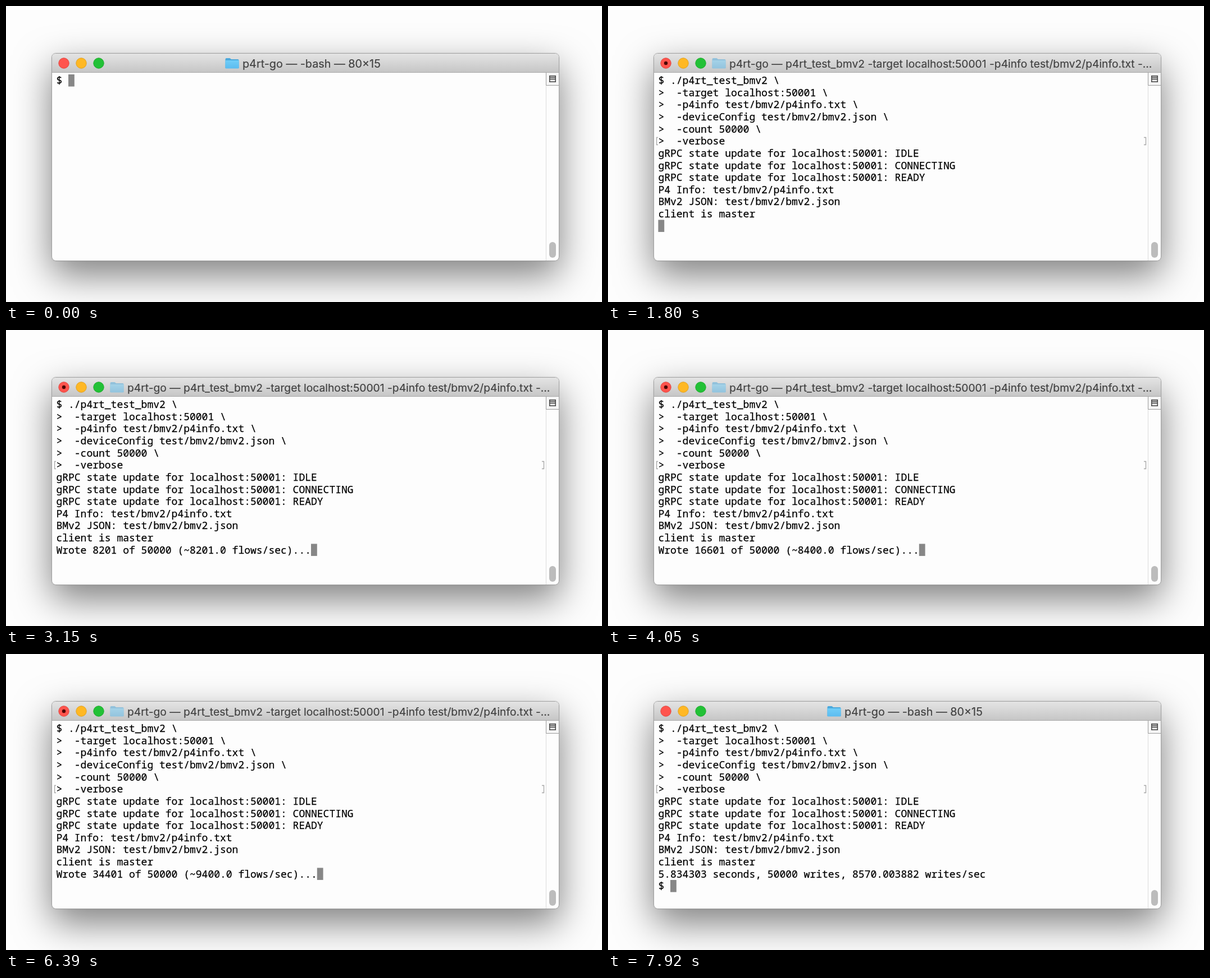
Animation of 1061x528 px, one loop 8000 ms. Source, as an HTML page:

```html
<!DOCTYPE html>
<html lang="en">
<head>
<meta charset="utf-8">
<title>Terminal</title>
<style>
  html, body { margin: 0; width: 100%; height: 100%; overflow: hidden; background: #fdfdfd; }
  .window {
    position: absolute; left: 81px; top: 84px; width: 904px; height: 371px;
    border-radius: 8px;
    box-shadow: 0 25px 66px rgba(0, 0, 0, .5), 0 0 1px rgba(0, 0, 0, .45);
  }
  svg { position: absolute; left: 0; top: 0; display: block; }
  .title { font: 19.25px Inter, "Open Sans", sans-serif; fill: #414141; stroke: #414141; stroke-width: .2; }
  #idleTitle .title { font-size: 19.8px; }
  .term {
    font: 18px "Noto Sans Mono", "DejaVu Sans Mono", monospace;
    fill: #000; stroke: #000; stroke-width: .25;
  }
</style>
</head>
<body>
<div class="window"></div>
<svg width="1061" height="528" viewBox="0 0 1061 528">
  <defs>
    <linearGradient id="bar" x2="0" y2="1">
      <stop offset="0" stop-color="#e4e4e4"/>
      <stop offset="1" stop-color="#c6c6c6"/>
    </linearGradient>
    <linearGradient id="paper" x2="0" y2="1">
      <stop offset="0" stop-color="#70cdf7"/>
      <stop offset="1" stop-color="#5bbcf0"/>
    </linearGradient>
    <g id="folder">
      <path d="M0 2Q0 0 2 0H8L10.5 2H22Q24 2 24 4V18H0Z" fill="#4ba9dc"/>
      <path d="M0 4H24V17Q24 18.5 22.5 18.5H1.5Q0 18.5 0 17Z" fill="url(#paper)"/>
    </g>
  </defs>

  <rect x="81.5" y="84.5" width="903" height="370" rx="7.5" fill="#fdfdfd" stroke="#a3a3a3"/>
  <path d="M82 118V92Q82 85 89 85H977Q984 85 984 92V118Z" fill="url(#bar)"/>
  <path d="M82 118.5H984" stroke="#a9a9a9"/>

  <g stroke-width="1">
    <circle cx="103" cy="102" r="9.2" fill="#ff544d" stroke="#e2443e"/>
    <circle cx="134" cy="102" r="9.2" fill="#ffb824" stroke="#e2a01d"/>
    <circle cx="165" cy="102" r="9.2" fill="#22c136" stroke="#1aab29"/>
  </g>
  <circle id="busyDot" cx="103" cy="102" r="3.2" fill="#4c0603"/>

  <g id="idleTitle">
    <use href="#folder" x="390.5" y="93"/>
    <text class="title" x="421" y="109.5">p4rt-go — -bash — 80×15</text>
  </g>
  <g id="busyTitle">
    <use href="#folder" x="185.5" y="93" opacity=".5"/>
    <text class="title" x="216" y="109.5">p4rt-go — p4rt_test_bmv2 -target localhost:50001 -p4info test/bmv2/p4info.txt -…</text>
  </g>

  <path d="M961.5 119V454" stroke="#dcdcdc"/>
  <rect x="962" y="119" width="22" height="22" fill="#f6f6f6"/>
  <path d="M961.5 119V141.5H984" fill="none" stroke="#9a9a9a"/>
  <rect x="967.75" y="124.75" width="10.5" height="10.5" fill="#e8e8e8" stroke="#454545" stroke-width="1.5"/>
  <path d="M968 127.5H978M968 130.5H978" stroke="#454545" stroke-width="1.4"/>
  <rect x="967" y="421" width="12" height="28" rx="6" fill="#bcbcbc"/>

  <path id="marks" d="M89 234.5H86.5V247.5H89M954 234.5H957.5V247.5H954" fill="none" stroke="#a6a6a6" stroke-width="1.3"/>
  <rect id="cursor" width="10.8" height="21.6" fill="#878787"/>
  <g id="screen" class="term"></g>
</svg>

<script>
const LOOP = 8000;
const LEFT = 89.4, TOP = 122, CELL = 10.8, ROW = 21.62, BASE = 17.2;
const PASTE = 720, ENTER = 1260, START = 1800, DONE = START + 5834;

const command = [
  "$ ./p4rt_test_bmv2 \\",
  ">  -target localhost:50001 \\",
  ">  -p4info test/bmv2/p4info.txt \\",
  ">  -deviceConfig test/bmv2/bmv2.json \\",
  ">  -count 50000 \\",
  ">  -verbose",
];
const output = [
  [1350, "gRPC state update for localhost:50001: IDLE"],
  [1350, "gRPC state update for localhost:50001: CONNECTING"],
  [1350, "gRPC state update for localhost:50001: READY"],
  [1440, "P4 Info: test/bmv2/p4info.txt"],
  [1440, "BMv2 JSON: test/bmv2/bmv2.json"],
  [1440, "client is master"],
];
const totals = [0, 8201, 16601, 25001, 34401, 43001];

const $ = id => document.getElementById(id);
const show = (id, on) => $(id).setAttribute("visibility", on ? "visible" : "hidden");

// The last entry is the line that holds the cursor.
function linesAt(t) {
  if (t < PASTE) return ["$ "];
  if (t < ENTER) return command;
  const lines = command.concat(output.filter(([at]) => t >= at).map(([, text]) => text));
  if (t >= DONE) {
    return lines.concat("5.834303 seconds, 50000 writes, 8570.003882 writes/sec", "$ ");
  }
  const second = Math.max(0, Math.floor((t - START) / 1000));
  const rate = (totals[second] - totals[second - 1]).toFixed(1);
  return lines.concat(second ? `Wrote ${totals[second]} of 50000 (~${rate} flows/sec)...` : "");
}

// Non-breaking spaces keep double spaces from collapsing.
function textLine(line, i) {
  const text = document.createElementNS("http://www.w3.org/2000/svg", "text");
  text.setAttribute("x", LEFT);
  text.setAttribute("y", TOP + i * ROW + BASE);
  text.textContent = line.replaceAll(" ", "\u00a0");
  return text;
}

let shown = null;
function draw(t) {
  const busy = t >= ENTER && t < DONE;
  const lines = linesAt(t);
  const key = busy + lines.join("\n");
  if (key === shown) return;
  shown = key;

  show("busyDot", busy);
  show("busyTitle", busy);
  show("idleTitle", !busy);
  show("marks", t >= ENTER);

  $("screen").replaceChildren(...lines.map(textLine));
  const last = lines.length - 1;
  $("cursor").setAttribute("x", LEFT + lines[last].length * CELL);
  $("cursor").setAttribute("y", TOP + last * ROW);
}

const begin = performance.now();
function tick() {
  draw((performance.now() - begin) % LOOP);
  requestAnimationFrame(tick);
}
tick();
</script>
</body>
</html>
```
